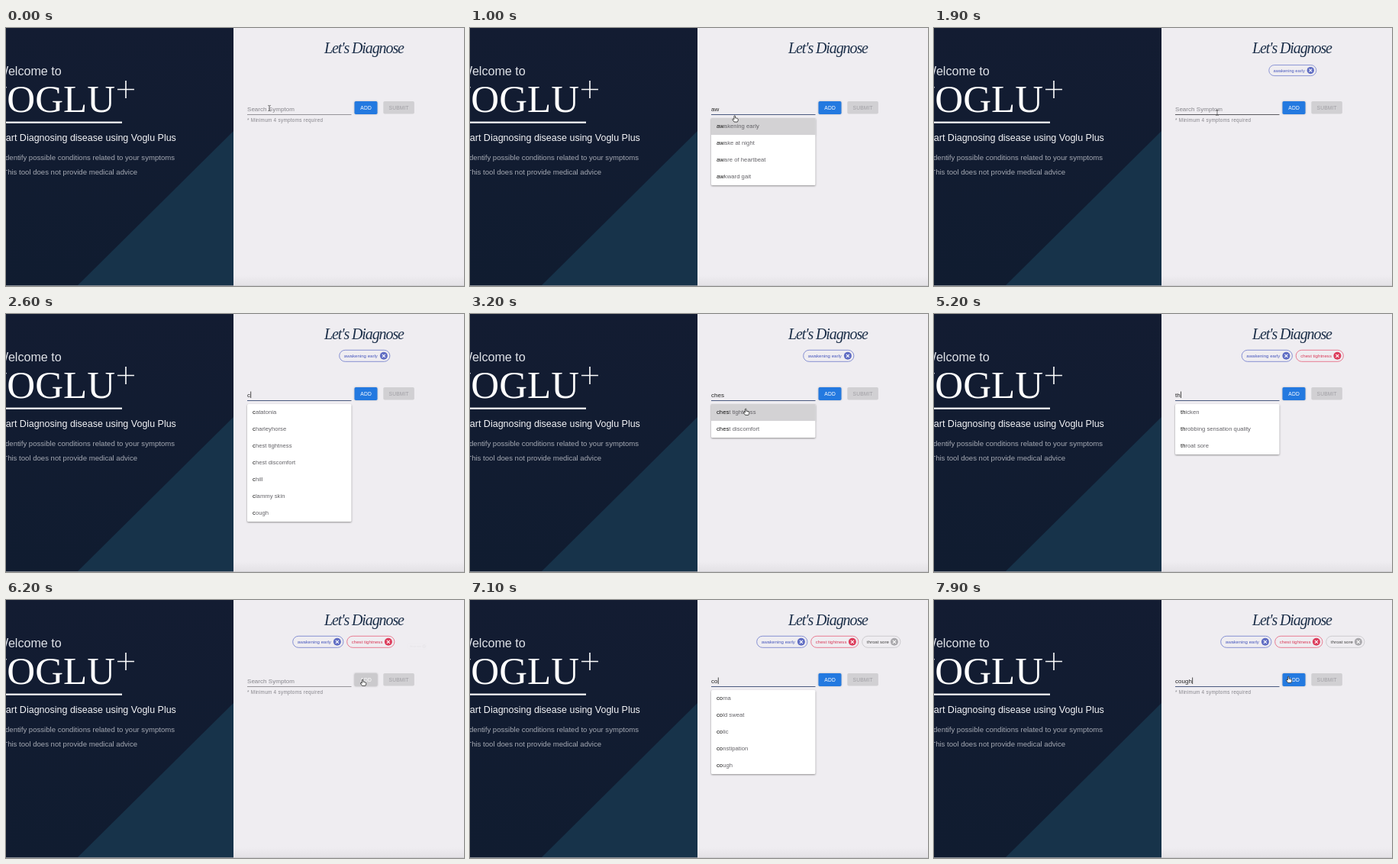
An HTML page that plays this animation: 600 px wide and 338 px high, repeating every 8000 ms.

```html
<!DOCTYPE html>
<html lang="en">
<head>
<meta charset="utf-8">
<title>Let's Diagnose</title>
<style>
  html, body { margin: 0; width: 100%; height: 100%; overflow: hidden; background: #efedf1; }
  svg { display: block; width: 100%; height: 100%; }
  text { font-family: "Liberation Sans", Arial, sans-serif; white-space: pre; }
  .brand { font: 51px "Liberation Serif", serif; fill: #fff; }
  .script { font: italic 20px "Liberation Serif", serif; letter-spacing: -1.1px; fill: #1c2f49; }
  .field { font-size: 7.65px; letter-spacing: .04px; }
  #query { font-size: 8px; }
  .button { font-size: 6.7px; letter-spacing: .15px; text-anchor: middle; }
  .chip text { font-size: 6.1px; }
  #panel { filter: drop-shadow(0 1px 1.2px rgba(0, 0, 0, .4)); }
  #add { filter: drop-shadow(0 .6px 1px rgba(0, 0, 0, .25)); }
</style>
</head>
<body>
<svg viewBox="0 0 600 338" preserveAspectRatio="none">
  <defs>
    <linearGradient id="navy" x2="0" y2="1">
      <stop stop-color="#131c32"/><stop offset="1" stop-color="#101c30"/>
    </linearGradient>
    <linearGradient id="shade" x2="0" y2="1">
      <stop stop-color="#efedf1"/><stop offset="1" stop-color="#e4e2e6"/>
    </linearGradient>
  </defs>

  <rect width="600" height="338" fill="#efedf1"/>
  <rect x="298" y="324" width="302" height="13" fill="url(#shade)"/>
  <rect width="298" height="337" fill="url(#navy)"/>
  <path d="M298 135V337H94Z" fill="#17334a"/>
  <rect y="337" width="298" height="1" fill="#858a93"/>
  <rect x="298" y="337" width="302" height="1" fill="#cfced2"/>

  <text x="-12" y="62" font-size="16.1" fill="#dfe2e8">Welcome to</text>
  <text class="brand" x="143" y="109.7" text-anchor="end">VOGLU</text>
  <path d="M146 80.5H168M157 69V92" stroke="#fff" stroke-width="1.6"/>
  <rect y="122.6" width="152" height="2.2" fill="#fff"/>
  <text x="-12" y="148" font-size="12.5" fill="#f4f5f8">Start Diagnosing disease using Voglu Plus</text>
  <g font-size="9.58" fill="#a6aab4">
    <text x="-3.7" y="172.5">Identify possible conditions related to your symptoms</text>
    <text x="-3.7" y="192">This tool does not provide medical advice</text>
  </g>

  <text class="script" x="417" y="33">Let's Diagnose</text>
  <g id="chips"></g>

  <text id="query" class="field" x="316" y="108.6"></text>
  <rect id="caret" y="101.5" width=".8" height="8.5" fill="#222"/>
  <rect id="underline" x="316" y="113" width="136.5"/>
  <text x="316" y="123.2" font-size="6.35" letter-spacing=".29" fill="#85848a">* Minimum 4 symptoms required</text>

  <rect id="add" x="456.5" y="96" width="30" height="17" rx="1.8"/>
  <text class="button" x="471.6" y="106.9" fill="#fff">ADD</text>
  <rect x="494.3" y="96" width="40.6" height="16.6" rx="1.8" fill="#d1d0d3"/>
  <text class="button" x="514.7" y="106.9" fill="#a09fa4">SUBMIT</text>

  <g id="panel">
    <rect id="sheet" x="316" y="118" width="136.5" rx="1.5" fill="#fff"/>
    <rect id="hover" x="316" width="136.5" height="22" fill="#d3d2d4"/>
    <g id="rows"></g>
  </g>

  <g id="pointer">
    <path id="beam" d="M-1.8 -3.6Q0 -3.6 0 -2.4Q0 -3.6 1.8 -3.6M0 -2.6V2.6M-1.8 3.6Q0 3.6 0 2.4Q0 3.6 1.8 3.6" fill="none" stroke="#444" stroke-width=".7"/>
    <path id="hand" d="M-1.6 -3.4Q-.8 -4.4 0 -3.4V-.8Q3.6 -1 3.8 1.2Q3.8 3 2.8 4.4H-1.4L-3.8 1Q-3.6 -.2 -1.6 1Z" fill="#fff" stroke="#222" stroke-width=".8" stroke-linejoin="round"/>
    <path id="arrow" d="M-2 -4V4L-.2 2.4L1 5L2 4.6L.9 2H3.2Z" fill="#222" stroke="#fff" stroke-width=".6"/>
  </g>
</svg>

<script>
const LOOP = 8000, CENTER = 469.8, ROW = 22, PANEL_TOP = 118;
const $ = id => document.getElementById(id);
const clamp = v => Math.min(1, Math.max(0, v));
const show = (el, on) => el.style.display = on ? '' : 'none';

function make(parent, tag, attrs, text = '') {
  const el = document.createElementNS('http://www.w3.org/2000/svg', tag);
  for (const key in attrs) el.setAttribute(key, attrs[key]);
  el.textContent = text;
  return parent.appendChild(el);
}

// Input steps: time, typed text, suggestions
const steps = [
  [0, '', ''],
  [250, 'a', 'abdomen acute,abdominal bloating,abnormal sensation,abscess bacterial,ache'],
  [600, 'aw', 'awakening early,awake at night,aware of heartbeat,awkward gait'],
  [1250, 'awakening early', ''],
  [1740, '', ''],
  [2500, 'c', 'catatonia,charleyhorse,chest tightness,chest discomfort,chill,clammy skin,cough'],
  [2700, 'ch', 'charleyhorse,chest tightness,chest discomfort,chill'],
  [2850, 'che', 'chest tightness,chest discomfort'],
  [3000, 'ches', 'chest tightness,chest discomfort'],
  [3400, 'chest tightness', ''],
  [3800, '', ''],
  [4500, 't', 'tachypnea,thicken,throbbing sensation quality,throat sore,tremor'],
  [4900, 'th', 'thicken,throbbing sensation quality,throat sore'],
  [5750, 'throat sore', ''],
  [6180, '', ''],
  [6900, 'co', 'coma,cold sweat,colic,constipation,cough'],
  [7200, 'cou', 'cough'],
  [7300, 'coug', 'cough'],
  [7600, 'cough', '']
].map(([time, text, list]) => ({ time, text, list: list ? list.split(',') : [] }));

// Pointer stops: time, x, y
const stops = [
  [0, 345, 105], [900, 345, 107], [1100, 350, 130], [1250, 350, 130],
  [1500, 469, 107], [1740, 469, 107], [1900, 371, 111], [2100, 345, 107],
  [2950, 345, 108], [3100, 362, 128], [3400, 362, 128], [3600, 468, 107],
  [3780, 468, 107], [3900, 392, 106], [4100, 345, 106], [5350, 345, 110],
  [5600, 350, 173], [5750, 350, 173], [5980, 468, 108], [6250, 468, 108],
  [6500, 350, 106], [7400, 345, 110], [7530, 350, 129], [7600, 350, 129],
  [7850, 465, 104], [8000, 465, 104]
];
const hiddenSpans = [[250, 900], [2450, 2950], [4400, 5350], [6800, 7400]];
const overAdd = [[1460, 1740], [3560, 3780], [5940, 6330], [7900, 8000]];

const chips = [
  { label: 'awakening early', color: '#6c79cb', ink: '#4858bd', icon: '#5f6cc3', width: 67, born: 1740 },
  { label: 'chest tightness', color: '#e6607a', ink: '#d93a59', icon: '#dc3c5b', width: 63, born: 3800 },
  { label: 'throat sore', color: '#c4c3c7', ink: '#444', icon: '#aaa9ad', width: 51, born: 6195 }
];
for (const chip of chips) {
  const { width: w, color, ink, icon, label } = chip;
  chip.el = make($('chips'), 'g', { class: 'chip' });
  make(chip.el, 'rect', { x: -w / 2 + .4, y: -7.5, width: w - .8, height: 15, rx: 7.5, fill: 'none', stroke: color, 'stroke-width': .8 });
  make(chip.el, 'text', { x: -w / 2 + 6.5, y: 2.1, fill: ink }, label);
  const x = w / 2 - 8.4;
  make(chip.el, 'circle', { cx: x, r: 5, fill: icon });
  make(chip.el, 'path', { d: `M${x - 2} -2l4 4m0 -4l-4 4`, stroke: '#fff', 'stroke-width': 1.1 });
}

const rows = Array.from({ length: 7 }, (_, i) => {
  const el = make($('rows'), 'text', { class: 'field', x: 323, y: PANEL_TOP + ROW * i + 13.4 });
  return {
    el,
    match: make(el, 'tspan', { fill: '#111' }),
    rest: make(el, 'tspan', { fill: '#626166' })
  };
});

function pointerAt(t) {
  const i = Math.max(1, stops.findIndex(s => s[0] > t));
  const [a, b] = [stops[i - 1], stops[i]];
  const p = clamp((t - a[0]) / (b[0] - a[0])), e = p * p * (3 - 2 * p);
  return [a[1] + (b[1] - a[1]) * e, a[2] + (b[2] - a[2]) * e];
}

// A new chip grows while rising into its row
function drawChips(t) {
  const shown = chips.filter(c => t >= c.born);
  let x = CENTER - (shown.reduce((sum, c) => sum + c.width + 4, -4)) / 2;
  for (const chip of chips) {
    show(chip.el, shown.includes(chip));
    if (t < chip.born) continue;
    const grow = 1 - (1 - clamp((t - chip.born) / 250)) ** 2;
    const scale = .5 + grow / 2, y = 54.8 + (1 - scale) * 12;
    chip.el.setAttribute('transform', `translate(${x + chip.width / 2} ${y}) scale(${scale})`);
    chip.el.setAttribute('opacity', clamp(grow * 1.3));
    x += chip.width + 4;
  }
}

function drawField(t, step, hovered, focused) {
  const query = $('query'), typed = step.text !== '';
  query.textContent = step.text || 'Search Symptom';
  query.setAttribute('fill', typed ? '#222' : '#85848a');
  show($('caret'), typed && hovered < 0 && (t - step.time) % 1000 < 500);
  if (typed) $('caret').setAttribute('x', 316.3 + query.getComputedTextLength());
  $('underline').setAttribute('height', focused ? 1 : .8);
  $('underline').setAttribute('fill', typed ? '#4a5a80' : focused ? '#5c5b60' : '#807f84');
}

function drawPanel(step, hovered) {
  const { list, text } = step;
  show($('panel'), list.length);
  $('sheet').setAttribute('height', list.length * ROW);
  show($('hover'), hovered >= 0);
  $('hover').setAttribute('y', PANEL_TOP + hovered * ROW);
  rows.forEach((row, i) => {
    show(row.el, i < list.length);
    row.match.textContent = i < list.length ? text : '';
    row.rest.textContent = i < list.length ? list[i].slice(text.length) : '';
  });
}

function drawAdd(t) {
  const h = Math.max(...overAdd.map(([a, b]) => Math.min(clamp((t - a) / 150), 1 - clamp((t - b) / 120))));
  const mix = (a, b) => Math.round(a + (b - a) * h);
  $('add').setAttribute('fill', `rgb(${mix(35, 203)},${mix(121, 202)},${mix(224, 205)})`);
}

function draw(t) {
  const step = steps.findLast(s => s.time <= t);
  const [x, y] = pointerAt(t);
  const visible = !hiddenSpans.some(([a, b]) => t >= a && t < b);
  const row = Math.floor((y - PANEL_TOP) / ROW);
  const hovered = visible && row >= 0 && row < step.list.length ? row : -1;
  const onField = x < 453 && y > 97 && y < 116;
  const onAdd = x > 456 && x < 487 && y > 96 && y < 113;

  drawChips(t);
  drawField(t, step, hovered, step.text || (t > 100 && visible && onField));
  drawPanel(step, hovered);
  drawAdd(t);

  show($('pointer'), visible);
  $('pointer').setAttribute('transform', `translate(${x} ${y})`);
  show($('beam'), onField);
  show($('hand'), onAdd || hovered >= 0);
  show($('arrow'), !onField && !onAdd && hovered < 0);
}

const start = performance.now();
function tick() {
  draw((performance.now() - start) % LOOP);
  requestAnimationFrame(tick);
}
tick();
</script>
</body>
</html>
```
